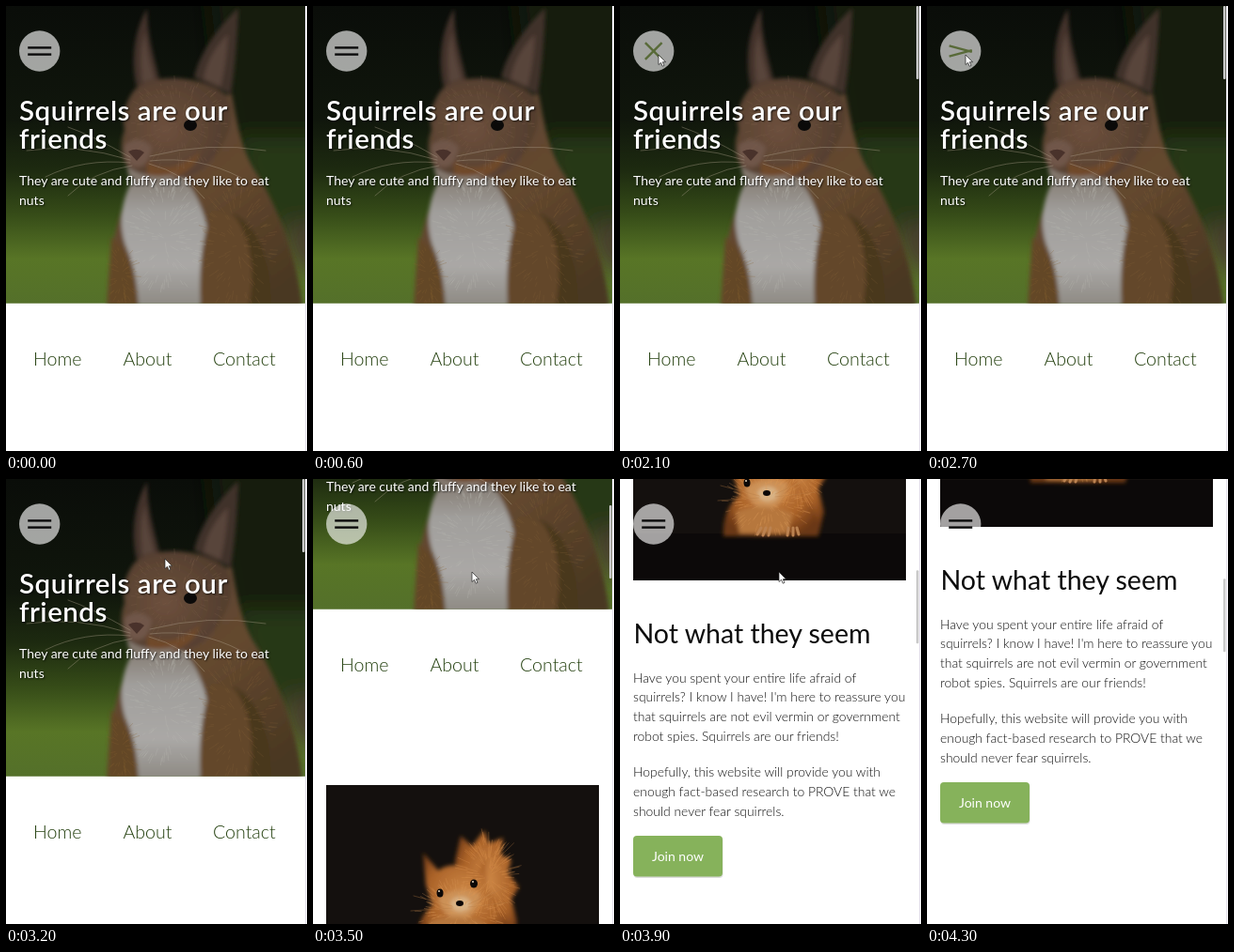
Animation of 320x474 px, one loop 4400 ms. Source, as an HTML page:

```html
<!DOCTYPE html>
<html lang="en">
<head>
<meta charset="utf-8">
<title>Squirrels are our friends</title>
<style>
  html, body { margin: 0; width: 100%; height: 100%; overflow: hidden; background: #fff; }
  svg { display: block; width: 100%; height: 100%; }
  text { font-family: Lato, "Open Sans", sans-serif; font-size: 14px; fill: #333; }
  .hero text { fill: #fff; text-shadow: 1px 1px 2px #000b; }
  .hero .title { font-size: 29.5px; font-weight: 600; letter-spacing: .5px; }
  .heading { font-size: 28.5px; fill: #0c0c0c; }
  .nav text { font-size: 19.6px; font-weight: 300; fill: #24400f; }
  .copy text { font-size: 13.9px; font-weight: 300; fill: #111; }
  .join { fill: #fff; text-anchor: middle; }
  .soft { filter: url(#soft); }
  .softer { filter: url(#softer); }
  .fur path, .whiskers { fill: none; stroke-linecap: round; }
</style>
</head>
<body>
<svg viewBox="0 0 320 474">
  <defs>
    <filter id="soft" x="-20%" y="-20%" width="140%" height="140%"><feGaussianBlur stdDeviation="2"/></filter>
    <filter id="softer" x="-40%" y="-40%" width="180%" height="180%"><feGaussianBlur stdDeviation="12"/></filter>
    <linearGradient id="meadow" x2="0" y2="1">
      <stop offset="0" stop-color="#0a0d09"/>
      <stop offset=".38" stop-color="#10160c"/>
      <stop offset=".55" stop-color="#1d2a10"/>
      <stop offset=".7" stop-color="#364c18"/>
      <stop offset=".85" stop-color="#587526"/>
      <stop offset="1" stop-color="#54702a"/>
    </linearGradient>
    <linearGradient id="coat" x1=".1" x2=".8" y2="1">
      <stop offset="0" stop-color="#5a4433"/>
      <stop offset=".5" stop-color="#64482f"/>
      <stop offset="1" stop-color="#493721"/>
    </linearGradient>
    <radialGradient id="face" cx=".4" cy=".5" r=".6">
      <stop offset="0" stop-color="#6d503d"/>
      <stop offset="1" stop-color="#523d2d"/>
    </radialGradient>
    <linearGradient id="chest" x2="0" y2="1">
      <stop offset="0" stop-color="#80766c"/>
      <stop offset=".3" stop-color="#a19f9c"/>
      <stop offset=".7" stop-color="#aaa8a6"/>
      <stop offset="1" stop-color="#8d8982"/>
    </linearGradient>
    <radialGradient id="ginger" cx=".5" cy=".45" r=".6">
      <stop offset="0" stop-color="#d08a48"/>
      <stop offset=".65" stop-color="#aa6228"/>
      <stop offset="1" stop-color="#6b3715"/>
    </radialGradient>
    <clipPath id="heroClip"><path d="M0 0H318V316.700H0Z"/></clipPath>
    <clipPath id="photoClip"><path d="M14 504H304V723H14Z"/></clipPath>
  </defs>

  <g id="page">
    <g class="hero">
      <g clip-path="url(#heroClip)">
        <path d="M0 0H318V317H0Z" fill="url(#meadow)"/>
        <g class="softer">
          <path d="M215 -30H350V150H235Z" fill="#141c0d"/>
          <path d="M240 140H350V235H270Z" fill="#283817"/>
          <path d="M292 232H350V282H306Z" fill="#48402f"/>
        </g>
        <g class="soft">
          <path d="M139 86C133 62 135 28 150 3C150 32 157 52 163 78Z" fill="#42332a"/>
          <path d="M145 82C142 60 143 42 148 28C149 48 154 62 158 78Z" fill="#59443a"/>
          <path d="M200 76C206 48 228 20 247 2C246 32 244 62 239 94Z" fill="#40322a"/>
          <path d="M210 78C213 58 224 42 236 30C235 52 232 70 228 86Z" fill="#59443a"/>
          <path d="M150 170C120 205 107 260 110 320H315C310 270 290 215 265 176C250 152 246 126 240 94L180 100Z" fill="url(#coat)"/>
          <path d="M134 186C120 212 120 240 130 262C138 282 139 300 141 320H206C213 282 219 246 210 222C204 204 196 190 186 180C168 174 148 176 134 186Z" fill="url(#chest)"/>
          <path d="M112 246C128 258 138 284 140 320H107Z" fill="#644728"/>
          <path d="M219 218C207 250 205 285 207 320H275C280 270 260 220 219 218Z" fill="#634729"/>
          <path d="M240 220C262 246 265 285 258 320H282C282 270 270 235 240 220Z" fill="#49371f"/>
          <path d="M136 90C153 71 211 73 235 96C247 121 232 156 207 175C182 190 147 188 129 171C120 157 122 143 126 132C123 117 127 102 136 90Z" fill="url(#face)"/>
          <path d="M150 165C165 178 188 172 206 155C203 176 172 192 150 184Z" fill="#70492c"/>
          <path d="M128 170C142 182 165 184 182 178C170 190 147 194 131 182Z" fill="#82776d"/>
          <path d="M126 148Q141 136 155 150Q152 172 138 172Q124 169 126 148Z" fill="#705648"/>
        </g>
        <g class="fur" id="heroFur"></g>
        <g class="soft">
          <ellipse cx="196" cy="127" rx="10" ry="8" fill="#624a39"/>
        </g>
        <ellipse cx="196" cy="127" rx="7" ry="6" fill="#0b0a09"/>
        <path d="M130 155Q140 150 147 156L139 165Z" fill="#49322b"/>
        <path class="whiskers" stroke="#b5a893" stroke-opacity=".55" stroke-width=".7"
          d="M132 164Q75 146 22 154M132 167Q82 162 42 182M134 170Q92 176 66 202M153 160Q215 144 276 154M153 165Q205 159 250 183M152 168Q190 178 211 205M132 161Q90 137 66 129"/>
      </g>
      <text class="title" x="14" y="122">Squirrels are our</text>
      <text class="title" x="14" y="152">friends</text>
      <text x="14" y="191">They are cute and fluffy and they like to eat</text>
      <text x="14" y="211.500">nuts</text>
    </g>

    <g class="nav">
      <text x="29" y="383">Home</text>
      <text x="124.500" y="383">About</text>
      <text x="220" y="383">Contact</text>
    </g>

    <g clip-path="url(#photoClip)">
      <path d="M14 504H304V723H14Z" fill="#14100e"/>
      <path d="M14 673H304V723H14Z" fill="#0c0909"/>
      <g class="soft">
        <path d="M151 585L157 558L169 569L182 552L187 566L202 560L200 578L211 584L207 597L219 613L211 625L217 650L211 675H165Z" fill="url(#ginger)"/>
        <path d="M110 676C109 655 116 642 127 632L120 610L117 576L133 595C146 586 163 589 174 598L183 582L186 614C201 632 212 655 211 676Z" fill="url(#ginger)"/>
        <path d="M133 624Q154 610 178 620Q176 643 156 648Q137 644 133 624Z" fill="#cc9156"/>
        <path d="M123 650Q152 638 184 652L178 673H127Z" fill="#b6773c"/>
        <ellipse cx="157" cy="631" rx="11" ry="8" fill="#d9b385"/>
      </g>
      <g class="fur" id="photoFur"></g>
      <g fill="#0b0807">
        <ellipse cx="135" cy="619" rx="3.500" ry="4.500"/>
        <ellipse cx="171" cy="609" rx="4" ry="4.500"/>
        <ellipse cx="156" cy="630" rx="4" ry="3"/>
      </g>
      <g fill="#e8d5bb">
        <circle cx="134" cy="617" r="1"/>
        <circle cx="170" cy="607" r="1"/>
      </g>
      <path class="whiskers" stroke="#b77b45" stroke-opacity=".6" stroke-width=".6"
        d="M148 633L107 622M148 635L104 638M165 631L207 612M165 634L208 629"/>
      <path class="whiskers" stroke="#bb8250" stroke-width="3"
        d="M146 674L150 667M152 675L155 667M158 675L160 667M178 675L179 667M184 675L184 667M190 674L188 667"/>
    </g>

    <text class="heading" x="14.500" y="790">Not what they seem</text>
    <g class="copy">
      <text x="14" y="831.500">Have you spent your entire life afraid of</text>
      <text x="14" y="852">squirrels? I know I have! I'm here to reassure you</text>
      <text x="14" y="873">that squirrels are not evil vermin or government</text>
      <text x="14" y="894">robot spies. Squirrels are our friends!</text>
      <text x="14" y="931.500">Hopefully, this website will provide you with</text>
      <text x="14" y="952.500">enough fact-based research to PROVE that we</text>
      <text x="14" y="973.500">should never fear squirrels.</text>
    </g>
    <rect x="14.500" y="996" width="95" height="44" rx="4" fill="#0002"/>
    <rect x="14" y="995" width="95" height="43.500" rx="4" fill="#86b25b"/>
    <text class="join" x="61.500" y="1022">Join now</text>
  </g>

  <path d="M318.500 0V474" stroke="#e5e1ec"/>
  <rect id="thumb" x="315" width="2.500" height="78" rx="1" fill="#c9c9c9"/>
  <circle cx="35.700" cy="48" r="21.700" fill="#fff" fill-opacity=".62"/>
  <g id="bars" stroke-width="2.400">
    <path d="M-12.500 0H12.500"/>
    <path d="M-12.500 0H12.500"/>
  </g>
  <path id="cursor" d="M0 0V10.500L2.500 8.300L4.200 12.200L6 11.400L4.300 7.700H7.500Z" fill="#fff" stroke="#222" stroke-width=".7"/>
</svg>
<script>
  const LOOP = 4400, STEP = 100;
  const $ = id => document.getElementById(id);
  const bars = [...$("bars").children];

  // Keys: [time, value, ...]
  const scrollKeys = [[3200, 0], [3300, 18], [3400, 82], [3500, 178], [3600, 324], [3700, 461],
                      [3800, 555], [3900, 615], [4000, 650], [4100, 667], [4200, 672]];
  const cursorKeys = [[700, 320, 150], [1100, 60, 55], [1300, 45, 47], [1800, 41, 52],
                      [2700, 41, 52], [3100, 169, 82], [3200, 169, 85], [3400, 169, 99]];
  const crossKeys = [[1600, 0], [1900, 1], [2500, 1], [2800, 0]];

  function sample(keys, time) {
    const next = keys.findIndex(key => key[0] > time);
    if (next === 0) return keys[0].slice(1);
    if (next < 0) return keys[keys.length - 1].slice(1);
    const from = keys[next - 1], to = keys[next];
    const mix = (time - from[0]) / (to[0] - from[0]);
    return from.slice(1).map((value, i) => value + (to[i + 1] - value) * mix);
  }

  let seed = 7;
  const random = () => (seed = seed * 16807 % 2147483647) / 2147483647;

  // Short hairs pointing away from the centre of an ellipse.
  function addFur(id, cx, cy, rx, ry, count, length, color) {
    let d = "";
    for (let i = 0; i < count; i++) {
      const angle = random() * Math.PI * 2, radius = Math.sqrt(random());
      const x = cx + Math.cos(angle) * rx * radius, y = cy + Math.sin(angle) * ry * radius;
      const reach = length * (0.4 + random());
      d += `M${x.toFixed(1)} ${y.toFixed(1)}l${(Math.cos(angle) * reach).toFixed(1)} ${(Math.sin(angle) * reach).toFixed(1)}`;
    }
    $(id).insertAdjacentHTML("beforeend", `<path d="${d}" stroke="${color}" stroke-width=".8" stroke-opacity=".35"/>`);
  }

  addFur("heroFur", 183, 125, 50, 46, 160, 5, "#7c6049");
  addFur("heroFur", 246, 255, 36, 68, 150, 7, "#7f6038");
  addFur("heroFur", 169, 248, 35, 62, 130, 7, "#bbb8b4");
  addFur("heroFur", 123, 286, 13, 32, 50, 6, "#83602f");
  addFur("photoFur", 187, 602, 24, 39, 150, 10, "#dc9450");
  addFur("photoFur", 157, 640, 43, 33, 180, 6, "#d99a58");

  function draw(now) {
    const time = Math.floor(now % LOOP / STEP) * STEP;
    const [scroll] = sample(scrollKeys, time);
    const [x, y] = sample(cursorKeys, time);
    const [cross] = sample(crossKeys, time);
    const pointer = time >= 700;
    const hover = pointer && Math.hypot(x - 35.7, y - 48) < 22;

    $("page").setAttribute("transform", `translate(0 ${-scroll})`);
    $("thumb").setAttribute("y", scroll * 0.158);
    $("thumb").style.visibility = pointer ? "visible" : "hidden";
    $("bars").setAttribute("stroke", hover ? "#586a38" : "#0b0b0b");
    bars.forEach((bar, i) => {
      const side = i ? 1 : -1;
      bar.setAttribute("transform", `translate(35.7 ${48 + side * 3.6 * (1 - cross)}) rotate(${-side * 45 * cross})`);
    });
    $("cursor").setAttribute("transform", `translate(${x} ${y})`);
    $("cursor").style.visibility = pointer && time < 4100 ? "visible" : "hidden";
  }

  const start = performance.now();
  function tick() {
    draw(performance.now() - start);
    requestAnimationFrame(tick);
  }
  tick();
</script>
</body>
</html>
```
